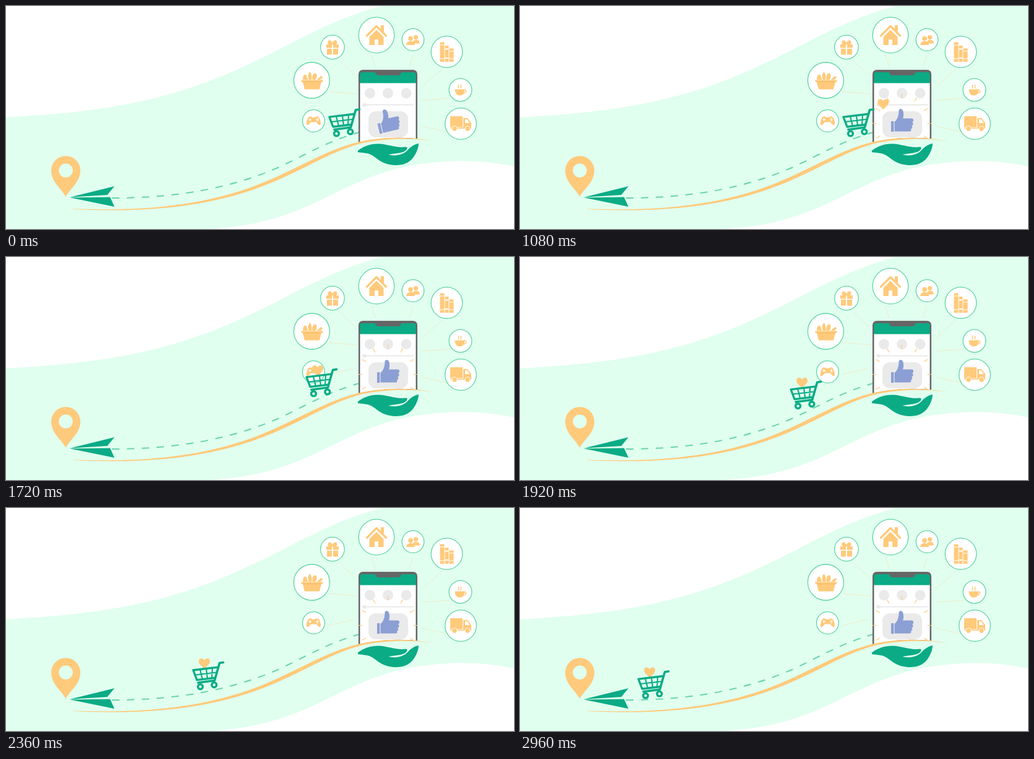
An HTML page for the animation above (3 s loop, 820 by 360 pixels).

```html
<!DOCTYPE html>
<html lang="en">
<head>
<meta charset="utf-8">
<title>Order on its way</title>
<style>
  html, body { margin: 0; width: 100%; height: 100%; overflow: hidden; background: #fff; }
  svg { display: block; width: 820px; height: 360px; }
  .o { fill: #ffca7b; }
  .g { fill: #0aab85; }
  .w { fill: #fff; }
  .grey { fill: #eaeaea; }
  .ol { fill: none; stroke: #ffca7b; stroke-linecap: round; stroke-linejoin: round; }
  .gl { fill: none; stroke: #0aab85; stroke-linecap: round; stroke-linejoin: round; }
  .wl { fill: none; stroke: #fff; }
  .ring { fill: #fff; stroke: #5fd6a5; stroke-width: 1.3; }
</style>
</head>
<body>
<svg viewBox="0 0 820 360">
  <path fill="#e0ffef" d="M0 180C75 175 150 170 230 151C340 126 420 80 480 50C520 30 560 12 607 0H820V259C770 248 720 248 670 255C590 266 540 300 480 326C430 347 385 357 325 360H0Z"/>

  <path fill="none" stroke="#fbd9a5" stroke-width=".7" opacity=".75" d="M590 79L596 98M538 88L564 113M520 138L566 142M518 190L562 180M657 80L651 98M704 102L671 131M716 149L671 152M712 203L671 194"/>

  <path fill="none" stroke="#6ad4ab" stroke-width="2" stroke-dasharray="12 12" d="M171 310C280 310 365 293 440 260.500C490 237 520 218 570 204"/>

  <!-- pin and paper plane -->
  <path class="o" fill-rule="evenodd" d="M96.5 308C90 295 73 285 73 265.5A23.5 23.5 0 0 1 120 265.5C120 285 103 295 96.5 308ZM85.3 265.5a11.2 11.2 0 0 0 22.4 0a11.2 11.2 0 0 0-22.4 0Z"/>
  <path class="g" d="M103 308.800L175 291L163.500 305ZM103 309.200L168 308.500L175 324Z"/>

  <!-- category bubbles -->
  <g transform="translate(527 66.5)">
    <circle class="ring" r="19.3"/>
    <path class="o" d="M-10-4.500H-1V1H-10ZM1-4.500H10V1H1ZM-9 2.500H-1V12H-9ZM1 2.500H9V12H1Z"/>
    <path class="o" d="M0-4.500H-6C-9-7-7-12-4-11C-2-10.500-1-9 0-7C1-9 2-10.500 4-11C7-12 9-7 6-4.500Z"/>
  </g>
  <g transform="translate(598 47)">
    <circle class="ring" r="28.8"/>
    <path class="ol" stroke-width="3.200" d="M-15.500 1L0-14.500L15.500 1"/>
    <path class="o" d="M7-16H12V-4L7-9ZM-11.500 3L0-8.500L11.500 3V16H3V7H-3V16H-11.500Z"/>
  </g>
  <g transform="translate(657 54.5)">
    <circle class="ring" r="17.8"/>
    <circle class="o" cx="4.5" cy="-4" r="3.6"/>
    <path class="o" d="M-1 6C-1-2 11-2 11 6Z"/>
    <circle class="o" cx="-4" cy="-2" r="4.2" stroke="#fff" stroke-width=".8"/>
    <path class="o" d="M-11 8.5C-11 0 3 0 3 8.5Z"/>
  </g>
  <g transform="translate(711.5 74)">
    <circle class="ring" r="25.3"/>
    <path class="o" d="M-11-15.500H-4V16H-11ZM-3-10H3V16H-3ZM4-5.500H11V16H4Z"/>
    <path class="wl" d="M-11-11H-4M-11 11H-4M4-1H11M4 11H11"/>
    <path class="wl" stroke-width="2" d="M-3-4.500H3M-3 10H3"/>
  </g>
  <g transform="translate(493.5 120)">
    <circle class="ring" r="29"/>
    <path class="o" d="M-17-.500H18V2.500H15.500L12.500 14.500H-11.500L-14.500 2.500H-17Z"/>
    <path class="o" d="M-14-1C-15-7-12-10-9-9L-6-1ZM-5-1L-6-8L-4-13H-2L0-8V-1ZM1-1C0-8 4-13 7-11C9-9 8-4 6-1ZM8-1L15-7L18-5L14-1Z"/>
    <path fill="none" stroke="#f7b95f" d="M-14.500 2.500H15.500"/>
  </g>
  <g transform="translate(733.5 135.5)">
    <circle class="ring" r="18.4"/>
    <path class="o" d="M-9-1H7C7 5 4 9-1 9C-6 9-9 5-9-1Z"/>
    <path class="ol" stroke-width="1.4" d="M6 0C11-1 10 5 5 5M-3-3C-5-5-1-6-3-8M1-3C-1-5 3-6 1-8"/>
  </g>
  <g transform="translate(734 190)">
    <circle class="ring" r="25.3"/>
    <path class="o" d="M-17-12H3V6H-17ZM4-9H11L17-1V8H-17V6H4Z"/>
    <path class="w" d="M7-7H10.500L14.500-1H7Z"/>
    <path class="wl" stroke-width=".8" d="M3.500-12V6M-17 6H4"/>
    <g class="o" stroke="#fff">
      <circle cx="-10" cy="8" r="4.2"/><circle cx="11" cy="8" r="4.2"/>
    </g>
  </g>
  <g transform="translate(496.5 185.5)">
    <circle class="ring" r="17.9"/>
    <path class="o" d="M-7-7C-4-8-3-5.500 0-5.500C3-5.500 4-8 7-7C10-6 12 2 11.500 5C11 8 8 7 4.500 2H-4.500C-8 7-11 8-11.500 5C-12 2-10-6-7-7Z"/>
    <path class="wl" stroke-width="1.300" d="M-8-2H-3.500M-5.800-4.300V.300M4-2H8.500" stroke-dasharray="none"/>
    <circle class="w" cx="6.200" cy="-4" r=".9"/><circle class="w" cx="6.200" cy="0" r=".9"/>
  </g>

  <!-- phone -->
  <path fill="#666" d="M569 221V110.500Q569 103 576.500 103H656.500Q664 103 664 110.500V214H600Z"/>
  <path class="w" d="M571.500 220V124H661.500V214Q610 210 571.500 220Z"/>
  <path class="g" d="M571.500 124.500V110.500Q571.500 107 575 107H658Q661.500 107 661.500 110.500V124.500Z"/>
  <path fill="#666" d="M595 105H639Q637 112 633 112H601Q597 112 595 105Z"/>
  <g class="grey">
    <circle cx="587.5" cy="140.700" r="8.5"/>
    <circle cx="616.5" cy="140.700" r="8.5"/>
    <circle cx="646" cy="140.700" r="8.5"/>
    <rect x="578" y="158.500" width="80" height="2"/>
    <circle cx="578.5" cy="159.500" r="3"/>
    <rect x="585" y="170" width="64" height="42" rx="12"/>
  </g>
  <path class="o" d="M108 327.500C212 331 300 324 380 298C460 272 510 232 575 218.300C620 209 660 213 692 218C660 214 620 212.500 577 221C515 236 465 277 382 302C300 327 212 333 108 328Z"/>
  <path class="g" d="M568 233.500C576 227 588 222 602 222.500C617 223 628 229.500 646 227.500C650 229 646 234 640 236C634 238 626 238 617 240C630 243 642 240 649 232C653 227 660 223 666 222C666 228 663 237 657 245C650 254 640 257 629 257C611 256.500 602 249 594 243C586 236.500 578 237.500 568 236Z"/>

  <g id="rays" class="ol" stroke-width="1.2"></g>
  <g id="thumb" fill="#8b9fd4">
    <rect x="599" y="186" width="4.300" height="17"/>
    <path d="M604.500 187C608.500 184 611.500 178 611.500 169C612 165 617 165 618.500 170C619.500 175 619 179 618 181.500H632C636 181.500 636 187 633 187.500C635.500 189 635 193 632 193.500C634 195 633.500 198 631 198.500C632 200.500 631 202.500 629 202.500H604.500Z"/>
  </g>

  <path id="heart" class="o" d="M0 8.500C-4 4-9 1-9-3.500C-9-9-2.500-10 0-5C2.500-10 9-9 9-3.500C9 1 4 4 0 8.500Z"/>
  <g id="cart" class="gl">
    <path stroke-width="3.600" d="M570.500 166.700L564.500 167.700L556.500 196L530 199.500"/>
    <path stroke-width="3.300" d="M561 174.500L522 179.200L528 195L557 191.500"/>
    <path stroke-width="2.100" d="M525 187L559 183M533 178L537 194M543 177L545 193M553 176L552 192"/>
    <circle cx="533.500" cy="206" r="3.900" stroke-width="3.400"/>
    <circle cx="555.800" cy="203" r="3.900" stroke-width="3.400"/>
  </g>
</svg>
<script>
const LOOP = 3000, CART_START = 1365, CART_END = 2985;
const NS = "http://www.w3.org/2000/svg";
const $ = id => document.getElementById(id);

function make(tag, attrs, parent) {
  const el = document.createElementNS(NS, tag);
  for (const key in attrs) el.setAttribute(key, attrs[key]);
  if (parent) parent.append(el);
  return el;
}

const clamp = v => Math.min(1, Math.max(0, v));
const span = (t, from, to) => clamp((t - from) / (to - from));
const ease = p => (1 - Math.cos(Math.PI * p)) / 2;
const easeOut = p => 1 - (1 - p) ** 2;

function track(d) {
  const path = make("path", { d });
  const length = path.getTotalLength();
  return p => path.getPointAtLength(p * length);
}

const cartTrack = track("M0 0C-110 42-207 97-331 97");
const heartTrack = track("M616.5 142Q583 166 540 168.500");

const rays = [];
for (let angle = -120; angle <= 120; angle += 30) {
  rays.push({ angle, el: make("line", {}, $("rays")) });
}

function drawRays(t) {
  const p = easeOut(span(t, 300, 760));
  const radius = 28 + 16.5 * p;
  const half = 3 * p;
  $("rays").setAttribute("opacity", span(t, 300, 480));
  for (const { angle, el } of rays) {
    el.setAttribute("transform", `translate(616.5 189.500) rotate(${angle})`);
    el.setAttribute("y1", -radius - half);
    el.setAttribute("y2", -radius + half);
  }
}

function thumbAngle(t) {
  return t < 500 ? -13 + 24 * ease(span(t, 0, 500)) : 11 * (1 - ease(span(t, 500, 860)));
}

function draw(t) {
  drawRays(t);
  $("thumb").setAttribute("transform", `rotate(${thumbAngle(t)} 617 185)`);

  const cart = cartTrack(ease(span(t, CART_START, CART_END)));
  $("cart").setAttribute("transform", `translate(${cart.x} ${cart.y})`);

  const heart = heartTrack(ease(span(t, 850, CART_START)));
  $("heart").setAttribute("transform", `translate(${heart.x + cart.x} ${heart.y + cart.y})`);
  $("heart").setAttribute("opacity", span(t, 400, 600));
}

const start = performance.now();
function frame(now) {
  draw(Math.max(0, now - start) % LOOP);
  requestAnimationFrame(frame);
}
draw(0);
requestAnimationFrame(frame);
</script>
</body>
</html>
```
